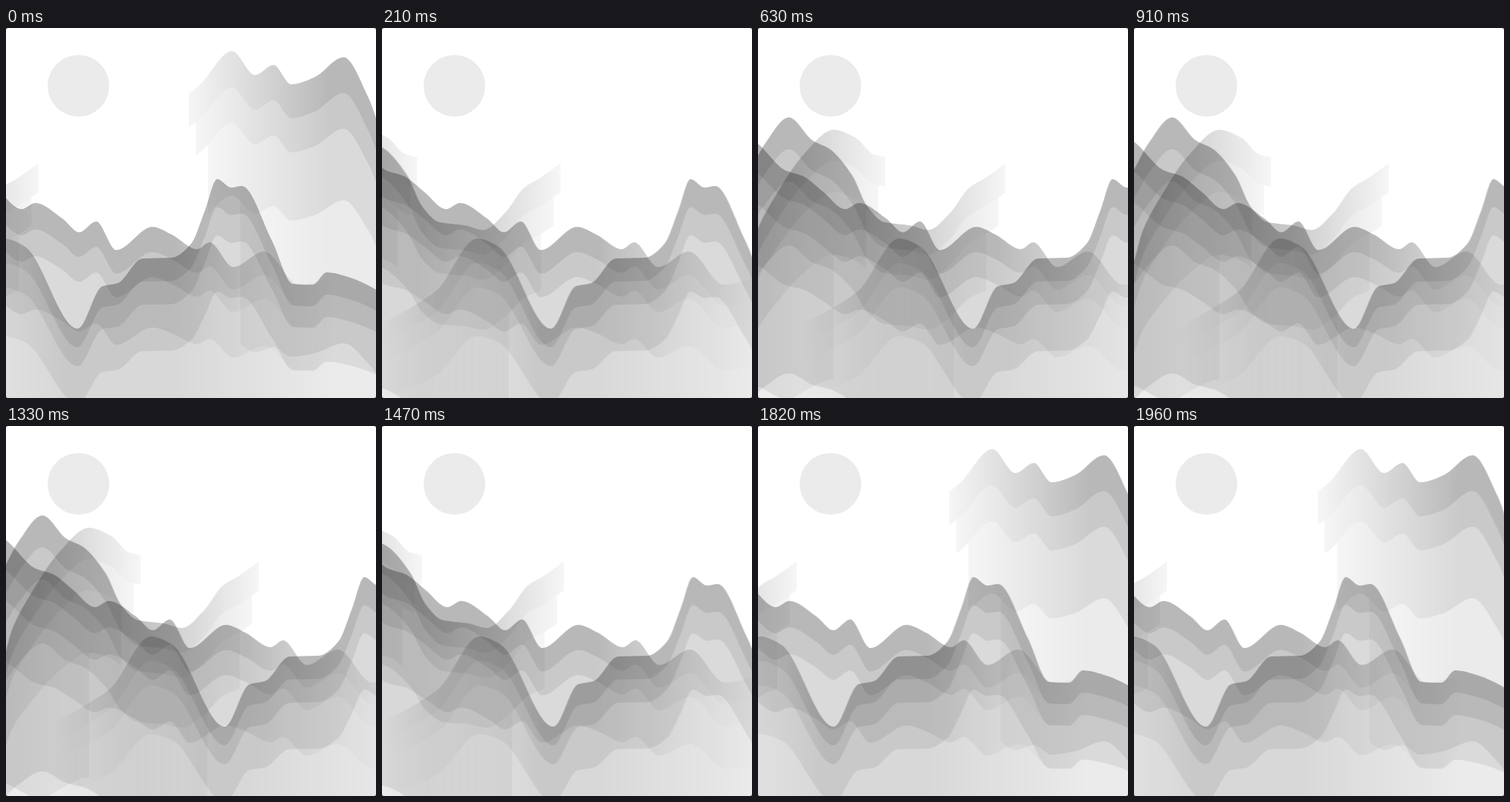
Write an HTML page that moves like this. It is 480x480 px and loops after 2520 ms.

```html
<!DOCTYPE html>
<html lang="en">
<head>
<meta charset="utf-8">
<title>Parallax mountains</title>
<style>
  html, body { margin: 0; width: 100%; height: 100%; overflow: hidden; background: #555; }
  svg { display: block; width: 100%; height: 100%; background: #fff; border-radius: 3px; }
</style>
</head>
<body>
<svg id="scene" viewBox="0 0 480 480">
  <defs id="defs"></defs>
  <circle cx="94" cy="75" r="40" fill="#ebebeb"/>
</svg>
<script>
const LOOP = 2520;
const TRAVEL = 97.2;
const TICK = 140;
const BACK = 1292; // time at which the view starts to return

// Quick glide out, soft swing back
function shift(t) {
  return TRAVEL * (t < BACK ? 1 - Math.exp(-t / 200) : Math.exp(-(((t - BACK) / 279) ** 2)));
}

// The picture moves in ticks, with a short pause near the end
const times = [0];
for (let t = TICK / 2; t <= 1610; t += TICK) times.push(t);
times.push(1820, 1960);

// Each ridge is repeated, squeezed towards a base line far below the stage
const BASE = 780;
const SCALES = [1, 0.9375, 0.875, 0.75, 0.5];
const ALPHAS = [0.28, 0.21, 0.145, 0.08];
const FADE = 210;

// peaks, valleys and shoulders; clear: x where the fade begins, dir: where it
// leads; cut: opacity below which nothing shows
const LAYERS = [
  { speed: 4, clear: -180, dir: -1, cut: 0.036, ridge: [
    [-402, 345], [-387, 310], [-373, 262], [-352, 222], [-312, 163], [-274, 132],
    [-246, 142], [-222, 164], [-180, 172]] },
  { speed: 4, clear: 210, dir: 1, cut: 0.036, ridge: [
    [210, 105], [252, 73], [293, 30], [323, 61], [347, 48], [370, 73], [400, 64],
    [438, 38], [470, 90], [492, 155]] },
  { speed: 3, clear: 69, dir: -1, cut: 0.036, ridge: [
    [-312, 215], [-290, 186], [-270, 150], [-239, 116], [-208, 146], [-186, 157],
    [-157, 191], [-137, 232], [-115, 252], [-82, 256], [-58, 262], [-30, 240],
    [-5, 207], [15, 195], [69, 155]] },
  { speed: 1, clear: 425, dir: -1, cut: 0, ridge: [
    [-115, 138], [-97, 147], [-57, 185], [-35, 192], [-8, 213], [20, 235], [38, 227],
    [73, 247], [95, 265], [117, 251], [143, 288], [190, 258], [215, 268], [248, 287],
    [264, 278], [295, 310], [335, 290], [380, 333], [430, 322]] },
  { speed: 2, clear: -130, dir: 1, cut: 0, ridge: [
    [-130, 385], [-81, 358], [-55, 340], [-3, 273], [25, 284], [93, 390], [125, 335],
    [145, 331], [177, 299], [215, 298], [240, 280], [258, 237], [274, 196], [292, 207],
    [306, 205], [345, 276], [372, 332], [398, 333], [416, 317], [447, 324], [500, 350]] }
];

const scene = document.getElementById('scene');
const defs = document.getElementById('defs');

function add(parent, tag, attrs) {
  const el = document.createElementNS('http://www.w3.org/2000/svg', tag);
  for (const name in attrs) el.setAttribute(name, attrs[name]);
  return parent.appendChild(el);
}

function squeeze(ridge, scale) {
  return ridge.map(([x, y]) => [x, BASE + (y - BASE) * scale]);
}

// Smooth curve that is level at every peak and valley
function curve(pts) {
  const rise = i => (pts[i + 1][1] - pts[i][1]) / (pts[i + 1][0] - pts[i][0]);
  const slope = pts.map((p, i) => {
    if (i === 0) return rise(0);
    if (i === pts.length - 1) return rise(i - 1);
    const a = rise(i - 1), b = rise(i);
    return a * b > 0 ? 2 * a * b / (a + b) : 0;
  });
  let d = pts[0].join(' ');
  for (let i = 1; i < pts.length; i++) {
    const [x0, y0] = pts[i - 1], [x1, y1] = pts[i];
    const h = (x1 - x0) / 3;
    d += ` C${x0 + h} ${y0 + h * slope[i - 1]} ${x1 - h} ${y1 - h * slope[i]} ${x1} ${y1}`;
  }
  return d;
}

function addFade(id, { clear, dir, cut }, alpha) {
  const edge = cut / alpha;
  const grad = add(defs, 'linearGradient', {
    id, gradientUnits: 'userSpaceOnUse', x1: clear, x2: clear + dir * FADE, y1: 0, y2: 0
  });
  for (const [offset, opacity] of [[edge, 0], [edge, edge], [1, 1]]) {
    add(grad, 'stop', { offset, 'stop-color': '#000', 'stop-opacity': opacity * alpha });
  }
}

function frames(speed) {
  const list = times.map(t => ({
    offset: t / LOOP,
    transform: `translateX(${shift(t) * speed}px)`,
    easing: 'steps(1, end)'
  }));
  return [...list, { ...list[list.length - 1], offset: 1 }];
}

LAYERS.forEach((layer, n) => {
  const group = add(scene, 'g', {});
  ALPHAS.forEach((alpha, k) => {
    const id = `fade-${n}-${k}`;
    addFade(id, layer, alpha);
    const top = curve(squeeze(layer.ridge, SCALES[k]));
    const bottom = curve(squeeze(layer.ridge, SCALES[k + 1]).reverse());
    add(group, 'path', { d: `M${top} L${bottom} Z`, fill: `url(#${id})` });
  });
  group.animate(frames(layer.speed), { duration: LOOP, iterations: Infinity });
});
</script>
</body>
</html>
```
